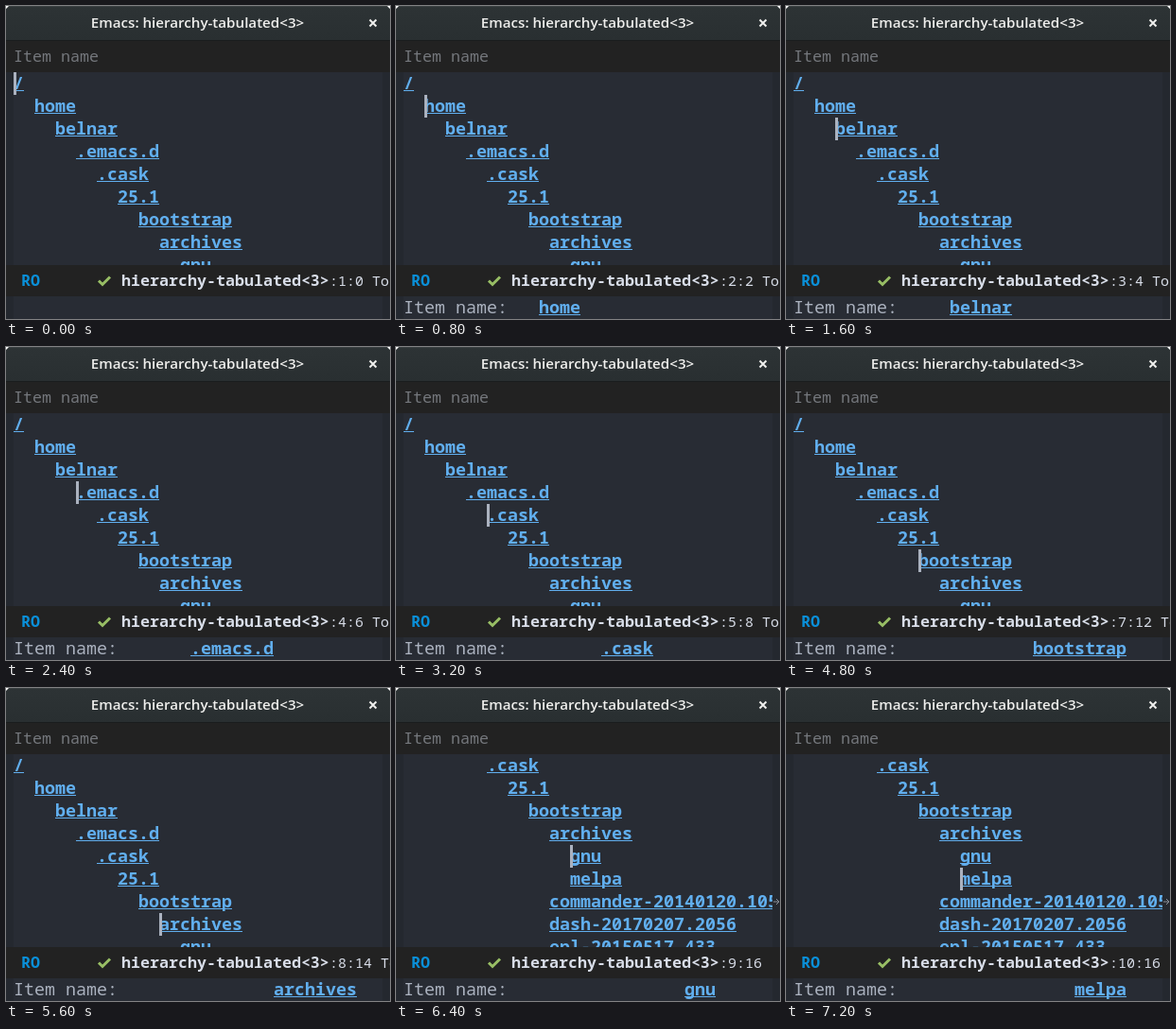
Animation of 406 by 331 pixels, one loop 8 s. Source, as an HTML page:

```html
<!DOCTYPE html>
<html lang="en">
<head>
<meta charset="utf-8">
<title>Tabulated hierarchy</title>
<style>
  html, body { margin: 0; width: 100%; height: 100%; overflow: hidden; background: #282c34; }
  svg { display: block; width: 406px; height: 331px; }
  text { font: 500 18.33px "Noto Sans Mono", monospace; fill: #abb2bf; white-space: pre; }
  .link { fill: #61afef; }
  text.link { font-weight: 600; }
  .title { font: 600 15.15px "Open Sans", sans-serif; fill: #eeeeec; text-anchor: middle; }
  .header { font-size: 16.67px; fill: #74777c; }
  .mode { font-size: 16.67px; font-weight: 700; fill: #d8dde8; }
  .position { font-size: 15px; fill: #d8dde8; }
  .bar { fill: #222222; }
  .fringe { fill: #24282f; }
</style>
</head>
<body>
<svg viewBox="0 0 406 331">
  <linearGradient id="titleBar" x2="0" y2="1">
    <stop stop-color="#2d3335"/>
    <stop offset="1" stop-color="#292f31"/>
  </linearGradient>
  <rect width="406" height="331" fill="#282c34"/>
  <g id="list"></g>
  <rect id="cursor" width="3" height="24" fill="#abb2bf"/>

  <rect class="fringe" y="70" width="8" height="261"/>
  <rect class="fringe" x="398" y="70" width="8" height="261"/>
  <path id="arrow" d="M399 226h6M402 223l3 3l-3 3" fill="none" stroke="#8b9099"/>

  <rect width="406" height="36" fill="url(#titleBar)"/>
  <rect width="406" height="1" fill="#383e40"/>
  <rect y="36" width="406" height="1" fill="#191c1d"/>
  <path d="M0 0h3l-3 3zM406 0h-3l3 3z" fill="#fff"/>
  <text class="title" x="202.5" y="23">Emacs: hierarchy-tabulated&lt;3&gt;</text>
  <path d="M384.5 14.5l7 7m0-7l-7 7" stroke="#eeeeec" stroke-width="2"/>
  <rect class="bar" y="37" width="406" height="33"/>
  <text class="header" x="8" y="59">Item name</text>

  <rect class="bar" y="274" width="406" height="33"/>
  <text class="mode" x="16" y="296" style="fill:#0a8fd8">RO</text>
  <path d="M98 290.5l4 4l8-8" fill="none" stroke="#98be65" stroke-width="3"/>
  <text class="mode" x="122" y="296">hierarchy-tabulated&lt;3&gt;</text>
  <text class="position" id="position" x="342" y="296"></text>

  <g id="echo">
    <text x="8" y="325">Item name:</text>
    <g id="echoLink"></g>
  </g>
</svg>
<script>
const STEP = 800, STEPS = 10, CHAR = 11, ROW = 24, LIST_TOP = 70, ECHO_TOP = 307;
const items = [
  ["/", 0], ["home", 2], ["belnar", 4], [".emacs.d", 6], [".cask", 8], ["25.1", 10],
  ["bootstrap", 12], ["archives", 14], ["gnu", 16], ["melpa", 16],
  ["commander-20140120.1053", 14], ["dash-20170207.2056", 14], ["epl-20150517.433", 14]
];
const $ = id => document.getElementById(id);
const columnX = column => 8 + column * CHAR;

function link(name, column, top) {
  const x = columnX(column);
  return `<text class="link" x="${x}" y="${top + 18}">${name}</text>` +
    `<rect class="link" x="${x}" y="${top + 19}" width="${name.length * CHAR}" height="1"/>`;
}

function show(row) {
  const [name, column] = items[row];
  const scrolled = row >= 8;
  const first = scrolled ? 4 : 0;
  const rowTop = index => LIST_TOP + (index - first) * ROW;

  $("list").innerHTML = items.slice(first, first + 9)
    .map(([label, indent], i) => link(label, indent, LIST_TOP + i * ROW)).join("");
  $("cursor").setAttribute("x", columnX(column));
  $("cursor").setAttribute("y", rowTop(row));
  $("arrow").style.display = scrolled ? "" : "none";
  $("position").textContent = `:${row + 1}:${column}` + (scrolled ? "" : " Top");
  $("echo").style.display = row ? "" : "none";
  $("echoLink").innerHTML = link(name, 11 + column, ECHO_TOP);
}

let shown = -1;
function tick() {
  const row = Math.floor(performance.now() / STEP) % STEPS;
  if (row !== shown) show(shown = row);
  requestAnimationFrame(tick);
}
tick();
</script>
</body>
</html>
```
